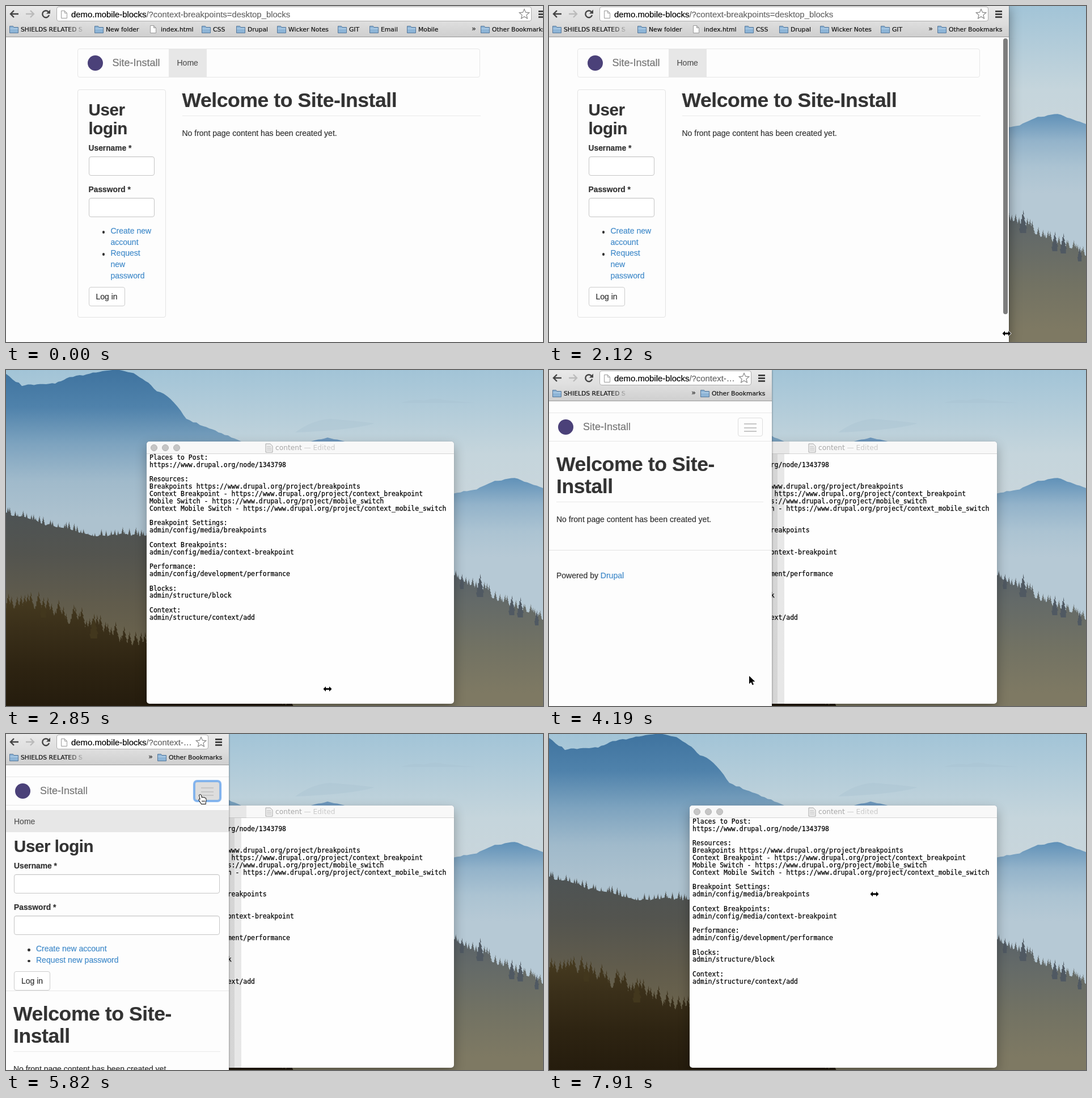
An HTML page for the animation above (8 s loop, 947 by 592 pixels).

```html
<!DOCTYPE html>
<html lang="en">
<head>
<meta charset="utf-8">
<title>Responsive blocks</title>
<style>
* { box-sizing: border-box; }
html, body { margin: 0; width: 100%; height: 100%; overflow: hidden; }
#stage { position: relative; width: 947px; height: 592px; overflow: hidden; background: #c3d1da; }
#stage svg { display: block; }
.abs, #stage > * { position: absolute; }
h1, h2, p, ul { margin: 0; }

#editor { left: 248px; top: 126px; width: 542px; height: 462px; border-radius: 5px; background: #fefefe;
  box-shadow: 0 8px 20px rgba(0,0,0,.3), 0 0 1px rgba(0,0,0,.4); overflow: hidden; }
#editor .bar { height: 22px; background: #f8f8f8; border-bottom: 1px solid #d4d4d4; }
#editor .title { left: 227px; top: 3px; font: 12.2px/17px "DejaVu Sans", sans-serif; color: #a6a6a6; white-space: pre; }
#editor .title span { color: #c9c9c9; }
#editor i { position: absolute; top: 5px; width: 12px; height: 12px; border-radius: 50%; background: #c6c6c6; border: 1px solid #b4b4b4; }
#editor pre { position: absolute; left: 5px; top: 22px; margin: 0; color: #000; font: 11.45px/12.82px "DejaVu Sans Mono", monospace; -webkit-text-stroke: .25px; }

#win { left: 0; top: 0; height: 592px; box-shadow: 0 3px 20px rgba(0,0,0,.42), 0 0 2px rgba(0,0,0,.5); }
#win.rest { box-shadow: 0 0 3px rgba(0,0,0,.5); }
#win.rest::before, #win.rest::after { content: ""; position: absolute; left: 100%; }
#win.rest::before { top: 126px; height: 22px; width: 31px; background: rgba(0,0,0,.07); }
#win.rest::after { top: 148px; height: 440px; width: 22px; background: linear-gradient(90deg, rgba(0,0,0,.16) 10px, rgba(0,0,0,.09) 10px); }
#clip { inset: 0; overflow: hidden; background: #fdfdfd; color: #333; -webkit-text-stroke: .2px;
  font: 14px/20px "Liberation Sans", Arial, sans-serif; }

#chrome { left: 0; right: 0; top: 0; height: 55px; background: linear-gradient(#e9e9e9, #dedede 28px, #cfcfcf); border-bottom: 1px solid #999; }
#url { left: 89px; right: 36px; top: 1px; height: 26px; background: #fff; border: 1px solid #adadad; border-radius: 4px; }
#url div { left: 25px; right: 26px; top: 3px; font-size: 14.9px; color: #666; white-space: nowrap; overflow: hidden; text-overflow: ellipsis; }
#url b { font-weight: normal; color: #000; }
#star { right: 39px; top: 4px; }
#menu { right: 12px; top: 8px; width: 12px; height: 13px; background: repeating-linear-gradient(#444 0 3px, transparent 3px 5px); }
.mark { position: absolute; top: 33px; height: 16px; padding-left: 20px; white-space: nowrap; color: #111;
  font: 10.8px/17px "DejaVu Sans", sans-serif; }
.mark svg { position: absolute; left: 0; top: 0; }
.fade { width: 133px; overflow: hidden; -webkit-mask-image: linear-gradient(90deg, #000 78%, transparent); mask-image: linear-gradient(90deg, #000 78%, transparent); }
#more { right: 134px; top: 31px; font: 13px/18px "DejaVu Sans", sans-serif; color: #333; }

h1 { font-size: 35.5px; line-height: 39px; letter-spacing: -.4px; padding-bottom: 7px; border-bottom: 1px solid #e9e9e9; margin-bottom: 20px; }
h2 { font-size: 29.5px; line-height: 33px; letter-spacing: -.4px; margin-bottom: 8.5px; }
.logo { position: absolute; width: 27px; height: 27px; border-radius: 50%; background: #4b4179; }
.brand { position: absolute; font-size: 18px; color: #777; }
.label { font-size: 13.8px; font-weight: bold; }
.field { height: 34px; margin: 4.5px 0 14.5px; border: 1px solid #c6c6c6; border-radius: 4px; background: #fff; box-shadow: inset 0 1px 1px rgba(0,0,0,.06); }
.form ul { list-style: none; padding-left: 39px; line-height: 19.7px; margin: 15px 0 9.7px; }
.form li { position: relative; }
.form li::before { content: ""; position: absolute; left: -15px; top: 9px; width: 4.5px; height: 4.5px; border-radius: 50%; background: #333; }
a { color: #428bca; }
.button { width: 64px; height: 34px; border: 1px solid #ccc; border-radius: 4px; background: #fff; text-align: center; line-height: 32px; }

#wide { top: 0; width: 710px; height: 592px; }
#wide .nav { left: 0; top: 75px; width: 710px; height: 51px; border: 1px solid #e7e7e7; border-radius: 4px; }
#wide .home { left: 161px; top: 76px; width: 67px; height: 49px; line-height: 49px; padding-left: 15px; background: #e7e7e7; color: #555; }
#wide .panel { left: 0; top: 147px; width: 156px; height: 402px; border: 1px solid #e3e3e3; border-radius: 4px; }
#wide .form { left: 20px; top: 166px; width: 116px; }
#wide .main { left: 185px; top: 147px; width: 526px; }
#scroll { right: 2px; top: 57px; width: 8px; height: 486px; border-radius: 4px; background: #7d7d7d; }

#slim { inset: 0; }
#slim .nav { left: 0; right: 0; top: 75px; height: 51px; border: solid #e7e7e7; border-width: 1px 0; }
#toggle { right: 16px; top: 84px; width: 44px; height: 33px; border: 1px solid #ddd; border-radius: 4px; }
#toggle::before { content: ""; position: absolute; left: 10px; top: 9px; width: 22px; height: 15px; background: repeating-linear-gradient(#c6c6c6 0 2px, transparent 2px 6.5px); }
#toggle.hot { background: #ddd; }
#toggle.focus { box-shadow: 0 0 1px 3px #7fb2ee; border-color: #8ab5e4; }
#fold { left: 0; right: 0; top: 126px; overflow: hidden; border-bottom: 1px solid #e7e7e7; }
#fold .home { left: 0; right: 0; top: 8px; height: 39px; line-height: 40px; padding-left: 14px; background: #e7e7e7; color: #555; }
#fold .form { left: 14px; right: 16px; top: 55px; }
#slim .main { left: 0; right: 0; }
#slim h1 { margin: 21px 15px 20px 13px; }
#slim p { margin-left: 13px; }
#slim .foot { margin-top: 44px; padding-top: 34px; border-top: 1px solid #e3e3e3; }
#pointer path { paint-order: stroke; }
</style>
</head>
<body>
<div id="stage">
  <svg id="scene" width="947" height="592"></svg>
  <div id="editor">
    <div class="bar"></div><i style="left:7px"></i><i style="left:27px"></i><i style="left:47px"></i>
    <svg class="abs" style="left:209px;top:3px" width="14" height="17"><path d="M1 1h8l4 4v11H1z" fill="#eee" stroke="#aaa"/><path d="M3 6h7M3 9h8M3 12h8" stroke="#bbb"/></svg>
    <div class="abs title">content <span>— Edited</span></div>
    <pre>Places to Post:
https://www.drupal.org/node/1343798

Resources:
Breakpoints https://www.drupal.org/project/breakpoints
Context Breakpoint - https://www.drupal.org/project/context_breakpoint
Mobile Switch - https://www.drupal.org/project/mobile_switch
Context Mobile Switch - https://www.drupal.org/project/context_mobile_switch

Breakpoint Settings:
admin/config/media/breakpoints

Context Breakpoints:
admin/config/media/context-breakpoint

Performance:
admin/config/development/performance

Blocks:
admin/structure/block

Context:
admin/structure/context/add</pre>
  </div>
  <div id="win"><div id="clip" class="abs">
    <div id="wide" class="abs">
      <div class="abs nav"></div>
      <div class="logo" style="left:18px;top:87px"></div>
      <div class="brand" style="left:62px;top:90px">Site-Install</div>
      <div class="abs home">Home</div>
      <div class="abs panel"></div>
      <div class="abs form"></div>
      <div class="abs main"><h1>Welcome to Site-Install</h1><p>No front page content has been created yet.</p></div>
    </div>
    <div id="scroll" class="abs"></div>
    <div id="slim" class="abs">
      <div class="abs nav"></div>
      <div class="logo" style="left:16px;top:87px"></div>
      <div class="brand" style="left:60px;top:90px">Site-Install</div>
      <div id="toggle" class="abs"></div>
      <div id="fold" class="abs"><div class="abs home">Home</div><div class="abs form"></div></div>
      <div class="abs main"><h1>Welcome to Site-Install</h1><p>No front page content has been created yet.</p>
        <div class="foot"><p>Powered by <a>Drupal</a></p></div></div>
    </div>
    <div id="chrome" class="abs">
      <svg class="abs" width="88" height="28" fill="none" stroke-width="2.4">
        <path d="M22 14H9M14 8l-6 6 6 6" stroke="#444"/><path d="M35 14h13M43 8l6 6-6 6" stroke="#bbb"/>
        <path d="M75 10.5A6 6 0 1 0 76 16" stroke="#444"/><path d="M78 6.5v7h-7z" fill="#444"/>
      </svg>
      <div id="url" class="abs">
        <svg class="abs" style="left:6px;top:5px" width="13" height="16"><path d="M1.5 1.5h6l4 4v9h-10z M7.5 1.5v4h4" fill="#fff" stroke="#999"/></svg>
        <div class="abs"><b>demo.mobile-blocks</b>/?context-breakpoints=desktop_blocks</div>
      </div>
      <svg id="star" class="abs" width="20" height="20"><path d="M10 1.5l2.5 5.7 6.2.6-4.7 4.1 1.4 6.1L10 14.8 4.6 18 6 11.9 1.3 7.800l6.2-.6z" fill="#fff" stroke="#8a8a8a" stroke-width="1.2"/></svg>
      <div id="menu" class="abs"></div>
      <div id="more" class="abs">»</div>
    </div>
  </div></div>
  <svg id="pointer" width="24" height="24" style="overflow:visible">
    <g id="size"><path d="M-7.5 0l4.5-4.5v3h6v-3L7.5 0 3 4.5v-3h-6v3z" fill="#000" stroke="#fff" stroke-width="1.6"/></g>
    <g id="arrow"><path d="M0 0v14l3.3-3.1 2.4 5.2 2.3-1-2.3-5.1h4.6z" fill="#000" stroke="#fff"/></g>
    <g id="hand"><path d="M-4-7q2-2 3 .5l1 4 1.5-1 1.5 1 1.5-.5 1.3 1.2 1.5.3q1 3-.5 6V8h-7l-4-6q-1-2 1-2l1 1z" fill="#fff" stroke="#000" stroke-width="1.8"/><path d="M1 2v3M3 2v3M5 2v3" stroke="#000" stroke-width=".8"/></g>
  </svg>
</div>
<script>
const $ = id => document.getElementById(id);

// Wallpaper
let seed = 7;
const rnd = () => (seed = seed * 16807 % 2147483647) / 2147483647;
const pairs = s => s.split(' ').map(p => p.split(',').map(Number));

function ridge(pts, wobble) {
  const out = [];
  for (let i = 1; i < pts.length; i++) {
    const [x0, y0] = pts[i - 1], [x1, y1] = pts[i], n = Math.ceil((x1 - x0) / 6);
    for (let k = 0; k < n; k++) out.push([x0 + (x1 - x0) * k / n, y0 + (y1 - y0) * k / n + (rnd() - .5) * wobble]);
  }
  out.push(pts[pts.length - 1]);
  return out;
}

function tree(x, y, h) {
  const w = h * .22;
  let d = `M${x} ${y - h}`;
  for (let k = 1; k < 5; k++) d += `L${x + w * k / 4} ${y - h + h * k / 4}l${-w / 4} 0`;
  d += `V${y + 8}H${x - w * .7}`;
  for (let k = 4; k > 0; k--) d += `L${x - w * k / 4} ${y - h + h * k / 4}l${w / 4} 0`;
  return d + 'Z';
}

// A ridge filled from its top with colours that settle at height `end`
function layer(id, line, wobble, stops, end, height = 0) {
  const pts = ridge(pairs(line), wobble);
  const top = Math.min(...pts.map(p => p[1])) - height;
  let d = 'M' + pts.map(p => p.map(v => v.toFixed(1)).join(' ')).join('L') + `L${pts[pts.length - 1][0]} 592L${pts[0][0]} 592Z`;
  if (height) for (const [x, y] of pts) d += tree(x + rnd() * 5, y + 3, height * (.3 + .7 * rnd()));
  const marks = stops.map((c, i) => `<stop offset="${i / (stops.length - 1)}" stop-color="${c}"/>`).join('');
  return `<linearGradient id="${id}" gradientUnits="userSpaceOnUse" x1="0" x2="0" y1="${top}" y2="${end}">${marks}</linearGradient><path d="${d}" fill="url(#${id})"/>`;
}

$('scene').innerHTML =
  layer('sky', '0,0 947,0', 0, ['#a2c4d7', '#c5d5dc', '#ccd6db', '#c1cfd8', '#b8c9d4'], 592) +
  '<path d="M510 110q30-22 62-24 40 3 78 8-40 12-140 16zM697 58q22-8 40-4 20-6 36-1l54 5z" fill="#a9c1d0" opacity=".4"/>' +
  layer('far', '510,134 545,124 567,119 590,124 620,134', 1, ['#6c97bd', '#b5c7d3'], 300) +
  layer('east', '640,240 790,217 830,210 862,196 897,190 925,200 947,208', 1.5,
    ['#6091b8', '#93b3ca', '#abc3d2', '#b6c9d5'], 330) +
  layer('west', '0,8 12,16 28,27 60,26 92,22 112,14 142,7 170,1 200,0 225,5 246,18 266,36 290,50 308,70 318,87 348,98 380,111 415,126', 3,
    ['#3f739f', '#4f82ab', '#7da3bf', '#a0bacb', '#adc2cf'], 260) +
  layer('slope', '420,400 640,350 790,360 815,378 840,390 872,408 910,424 947,440', 4,
    ['#535d68', '#646a68', '#727263', '#7e7963'], 570, 20) +
  `<path d="${tree(836, 392, 33)}${tree(804, 378, 19)}${tree(892, 424, 27)}${tree(907, 428, 28)}${tree(936, 442, 19)}" fill="#505962"/>` +
  layer('wood', '0,252 40,262 70,272 100,279 150,291 190,290 247,293 420,320', 5,
    ['#4c5356', '#53544f', '#615c4c', '#6d654d', '#6f6146'], 592, 17) +
  layer('front', '0,424 30,418 60,420 100,442 150,454 190,474 220,486 247,496 500,592', 6,
    ['#4a3e22', '#3b301a', '#2e2412', '#251c0d'], 592, 36) +
  `<path d="${tree(66, 428, 28)}${tree(155, 465, 36)}" fill="#42371d"/>`;

// Bookmarks and forms
const folder = '<svg width="16" height="16"><path d="M.5 2.5h6l1.5 2h7.5v10H.5z" fill="#8db4d6" stroke="#56789b"/><path d="M1 7h14" stroke="#c3dbef"/></svg>';
const sheet = '<svg width="14" height="16"><path d="M1.5 1.5h6l4 4v9h-10z M7.5 1.5v4h4" fill="#fff" stroke="#999"/></svg>';
const links = [['SHIELDS RELATED S', 6, 138], ['New folder', 156, 235], ['index.html', 253, 328], ['CSS', 345, 390],
  ['Drupal', 406, 462], ['Wicker Notes', 478, 568], ['GIT', 585, 624], ['Email', 641, 691], ['Mobile', 707, 764]];

function mark(text, icon, style) {
  const el = document.createElement('div');
  el.className = 'mark';
  el.style.cssText = style;
  el.innerHTML = icon + text;
  return $('chrome').appendChild(el);
}
const marks = links.map(([text, x, end]) => ({ end, el: mark(text, text.includes('.') ? sheet : folder, `left:${x}px`) }));
marks[0].el.classList.add('fade');
const other = mark('Other Bookmarks', folder, '');

for (const form of document.querySelectorAll('.form')) {
  form.innerHTML = '<h2>User login</h2>' +
    ['Username', 'Password'].map(s => `<div class="label">${s} *</div><div class="field"></div>`).join('') +
    '<ul><li><a>Create new account</a></li><li><a>Request new password</a></li></ul><div class="button">Log in</div>';
}

// Steps: time and value, each held until the next; width 0 hides the window
const LOOP = 8000, REST = 393, FOLD = 327;
const widths = [[0, 963], [1640, 940], [1790, 904], [1940, 860], [2120, 811], [2270, 775], [2420, 745], [2560, 705],
  [2700, 640], [2850, 0], [2990, 530], [3140, 480], [3290, 440], [3440, 410], [3590, REST],
  [7320, 425], [7470, 460], [7610, 500], [7760, 545], [7910, 0]];
const moves = [[0, ''], [1640, 'size', 890, 588], [1790, 'size', 840, 585], [1940, 'size', 825, 581], [2120, 'size', 807, 577],
  [2270, 'size', 774, 573], [2420, 'size', 738, 570], [2560, 'size', 692, 567], [2700, 'size', 630, 564], [2850, 'size', 567, 562],
  [2990, 'size', 515, 558], [3140, 'size', 470, 554], [3290, 'size', 430, 550], [3440, 'size', 400, 546], [3590, 'size', 376, 543],
  [3890, 'size', 357, 543], [4190, 'arrow', 353, 539], [4490, 'arrow', 352, 500], [4640, 'arrow', 350, 400], [4790, 'arrow', 348, 260],
  [4930, 'arrow', 346, 150], [5080, 'hand', 345, 115], [6720, 'arrow', 362, 170], [6870, 'arrow', 384, 240], [7020, 'size', 400, 282],
  [7320, 'size', 425, 282], [7470, 'size', 460, 282], [7610, 'size', 500, 282], [7760, 'size', 540, 282], [7910, 'size', 574, 282]];
const folds = [[0, 0], [5380, .1], [5530, .55], [5670, .92], [5820, 1]];

const at = (table, t) => table.filter(row => row[0] <= t).pop();
const show = (el, on) => { el.style.visibility = on ? 'inherit' : 'hidden'; };

function draw(t) {
  const w = at(widths, t)[1], open = at(folds, t)[1], [, kind, x, y] = at(moves, t);
  const wide = w >= 768;
  $('win').style.visibility = w ? 'visible' : 'hidden';
  $('win').style.width = w + 'px';
  $('win').className = w === REST ? 'rest' : '';
  $('wide').style.left = w / 2 - 356 + 'px';
  show($('wide'), wide);
  show($('slim'), !wide);
  show($('scroll'), wide);
  for (const m of marks) show(m.el, m.end < w - 162);
  other.style.left = w - 126 + 'px';
  $('toggle').className = 'abs' + (t >= 5080 ? ' hot' : '') + (open ? ' focus' : '');
  $('fold').style.height = open * FOLD + 'px';
  $('fold').style.display = open ? 'block' : 'none';
  document.querySelector('#slim .main').style.top = 126 + open * FOLD + 'px';
  for (const id of ['size', 'arrow', 'hand']) $(id).style.display = id === kind ? 'inline' : 'none';
  if (kind) $('pointer').style.transform = `translate(${x}px, ${y}px)`;
}

const start = performance.now();
function tick() {
  draw((performance.now() - start) % LOOP);
  requestAnimationFrame(tick);
}
tick();
</script>
</body>
</html>
```
